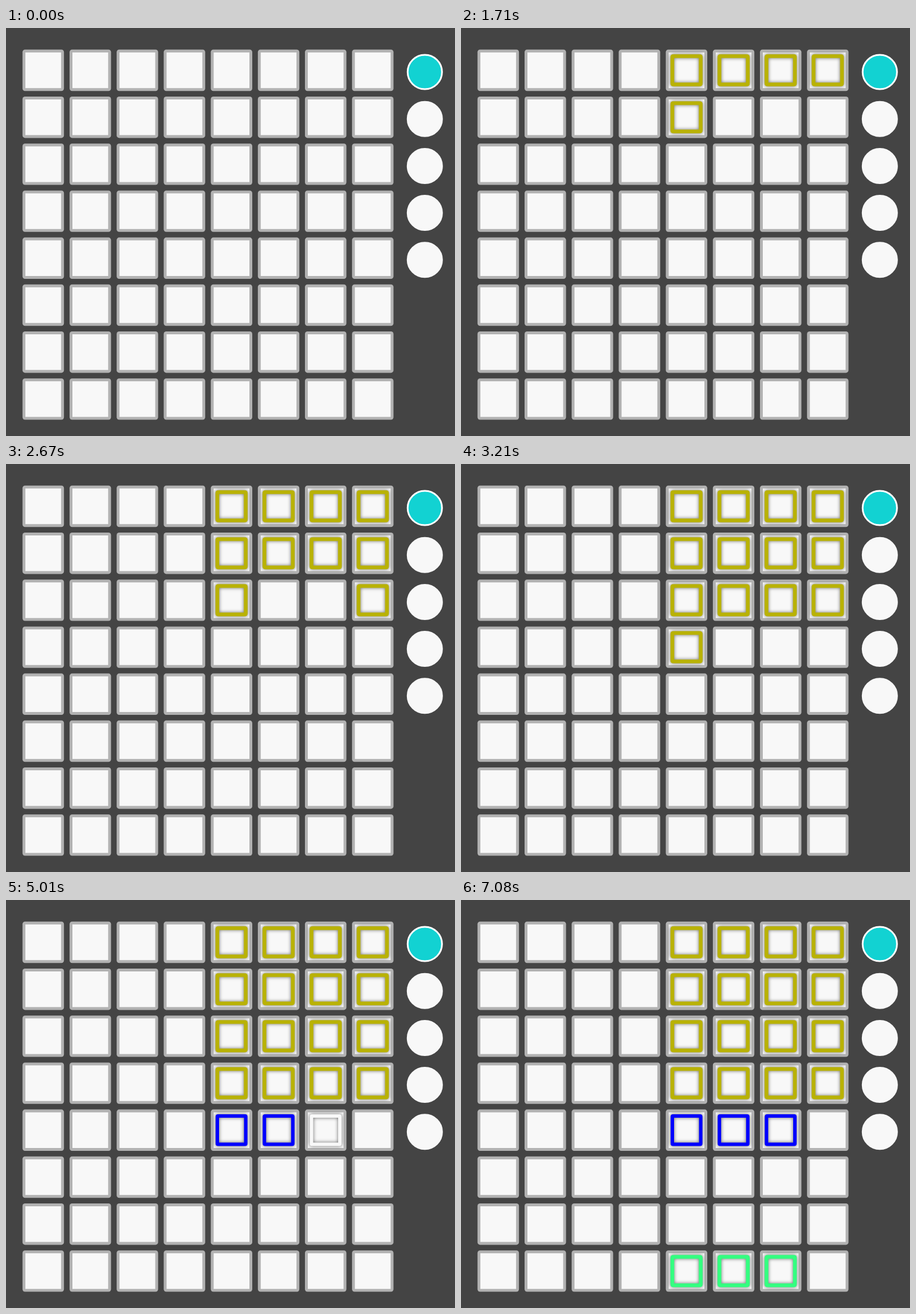
These frames come from a looping animation (784x714 px, 8 s). An HTML page:

```html
<!DOCTYPE html>
<html lang="en">
<head>
<meta charset="utf-8">
<title>Pad grid</title>
<style>
  html, body { margin: 0; width: 100%; height: 100%; overflow: hidden; background: #444; }
  svg { display: block; width: 784px; height: 714px; }
</style>
</head>
<body>
<svg id="stage" viewBox="0 0 784 714">
  <defs>
    <filter id="shade" filterUnits="userSpaceOnUse" x="-34" y="-34" width="68" height="68" color-interpolation-filters="sRGB">
      <feDropShadow dx="0" dy="0" stdDeviation="3" flood-color="#000" flood-opacity=".6"/>
    </filter>
  </defs>
  <rect width="784" height="714" fill="#444"/>
</svg>
<script>
const LOOP = 8000, PITCH = 82.2, SIZE = 8;
const WHITE = '#f8f8f8', YELLOW = '#b9b205', BLUE = '#0000ff', GREEN = '#33ff80';
const stage = document.getElementById('stage');

function add(parent, tag, attrs) {
  const el = document.createElementNS('http://www.w3.org/2000/svg', tag);
  for (const key in attrs) el.setAttribute(key, attrs[key]);
  return parent.appendChild(el);
}

function square(parent, side, attrs) {
  return add(parent, 'rect', { x: -side / 2, y: -side / 2, width: side, height: side, ...attrs });
}

function cellAt(col, row) {
  const x = 65 + col * PITCH, y = 74 + row * PITCH;
  return add(stage, 'g', { transform: `translate(${x} ${y})` });
}

for (let row = 0; row < SIZE; row++) {
  for (let col = 0; col < SIZE; col++) {
    const cell = cellAt(col, row);
    square(cell, 72.4, { rx: 4.5, fill: '#b2b2b2' });
    square(cell, 62.4, { fill: WHITE });
  }
}

for (let i = 0; i < 5; i++) {
  add(stage, 'circle', {
    cx: 731.3, cy: 77 + i * PITCH, r: 30,
    fill: i ? WHITE : '#12d2d2', stroke: i ? WHITE : '#fff', 'stroke-width': 3
  });
}

// Each pad lights up white, then takes its colour.
const pads = [];
function addPad(col, row, on, tint, color) {
  const group = cellAt(col, row);
  const ring = square(group, 49.6, {
    rx: 1, fill: 'none', 'stroke-width': 6, 'stroke-linejoin': 'round', filter: 'url(#shade)'
  });
  const glow = square(group, 49.6, {
    rx: 2, fill: 'none', stroke: color, 'stroke-width': 7.5, 'stroke-opacity': color === BLUE ? 0 : 0.4
  });
  pads.push({ group, ring, glow, on, tint, color });
}

const beats = Array.from({ length: 14 }, (_, i) => 900 + i * 90).concat(
  [2220, 2310, 2400, 2490, 2580, 2670, 2730, 2850, 2940],
  [3030, 3120, 3210, 3330, 3420, 3510, 3630, 3720, 3810]
);
for (let i = 0; i < 16; i++) {
  const col = 4 + (4 - i % 4) % 4;
  addPad(col, Math.floor(i / 4), beats[2 * i], beats[2 * i + 1], YELLOW);
}
[[3870, 3960], [4320, 4410], [5010, 5100]].forEach(([on, tint], i) => addPad(4 + i, 4, on, tint, BLUE));
[[5580, 5670], [5880, 5970], [6960, 7080]].forEach(([on, tint], i) => addPad(4 + i, 7, on, tint, GREEN));

function draw(t) {
  for (const { group, ring, glow, on, tint, color } of pads) {
    group.style.display = t < on ? 'none' : '';
    ring.setAttribute('stroke', t < tint ? WHITE : color);
    glow.style.display = t < tint ? 'none' : '';
  }
}

let start;
function tick(now) {
  start ??= now;
  draw((now - start) % LOOP);
  requestAnimationFrame(tick);
}
draw(0);
requestAnimationFrame(tick);
</script>
</body>
</html>
```
